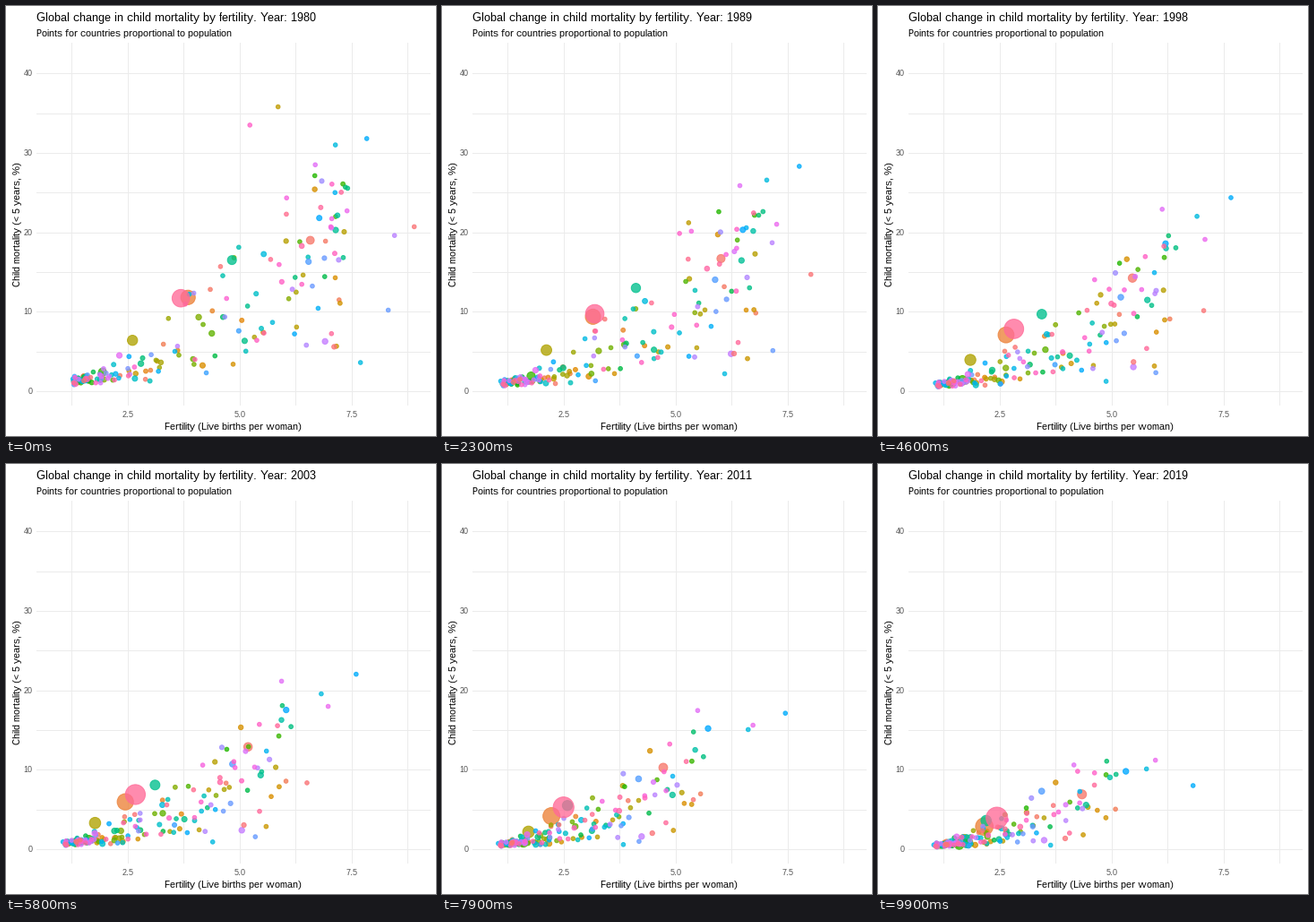
These frames come from a looping animation (480 by 480 pixels, 10000 ms). A matplotlib script:

```python
import matplotlib.pyplot as plt
import numpy as np
from matplotlib.animation import FuncAnimation

FRAMES, INTERVAL = 100, 100
SIZE, DPI = 480, 72
LEFT, RIGHT, TOP, BOTTOM = 34, 474, 41, 446
X_LIM, Y_LIM = (0.466, 9.266), (-1.812, 43.868)
ALPHA, STROKE, SMALL = 0.78, 1.0, 2.8

plt.rcParams.update({
    "font.family": ["Liberation Sans", "DejaVu Sans"],
    "text.hinting": "native",
    "text.hinting_factor": 1,
})


def hcl(k, light=65, chroma=100):
    """Evenly spaced hue, k in 0..1, as RGB through CIE Luv."""
    a = np.radians(15 + 360 * k)
    u = chroma * np.cos(a) / (13 * light) + 0.1978
    v = chroma * np.sin(a) / (13 * light) + 0.4683
    y = ((light + 16) / 116) ** 3
    x = 9 * y * u / (4 * v)
    z = 3 * y / v - x / 3 - 5 * y
    lin = np.clip([3.2406 * x - 1.5372 * y - 0.4986 * z,
                   -0.9689 * x + 1.8758 * y + 0.0415 * z,
                   0.0557 * x - 0.2040 * y + 1.0570 * z], 0, 1)
    return np.where(lin > 0.0031, 1.055 * lin ** (1 / 2.4) - 0.055, 12.92 * lin)


class Track:
    """A point easing from start to end; bend above 1 means an early fall."""

    def __init__(self, hue, start, end, bend=(1, 1), r=SMALL, spike=0):
        self.hue, self.r, self.spike = hue, r, spike
        self.start, self.end, self.bend = map(np.array, (start, end, bend))

    def at(self, t):
        x, y = self.end + (self.start - self.end) * (1 - t) ** self.bend
        y += self.spike * np.exp(-((t - 0.323) / 0.06) ** 2)
        return x, y, self.r + 0.3 * (self.r - SMALL) * t


tracks = [
    # large populations
    Track(0.95, (3.69, 11.7), (2.44, 3.93), (1.9, 1.1), r=10.3),
    Track(0.045, (3.85, 11.8), (2.16, 2.85), (2, 1.2), r=8.6),
    Track(0.003, (6.58, 19), (4.34, 6.9), (1.1, 0.8), r=4.9),
    Track(0.42, (4.83, 16.5), (2.2, 3.6), (1.2, 1.2), r=5.5),
    Track(0.18, (2.61, 6.4), (1.71, 1.1), (3, 1), r=6.2),
    Track(0.3, (1.94, 2.4), (1.6, 0.55), (2.5, 1.2), r=5),
    Track(0.63, (6.78, 21.8), (5.32, 9.8), (0.8, 0.5), r=3.5),
    Track(0.66, (6.54, 16.3), (3.44, 7.3), (0.9, 1.1), r=3.6),
    # small ones on the rim of the cloud
    Track(0.615, (7.84, 31.8), (6.82, 8), (0.3, 0.6)),
    Track(0.545, (7.14, 31), (5.78, 10.1), (0.3, 0.9)),
    Track(0.79, (6.69, 28.5), (4.16, 10.6), (0.4, 0.6)),
    Track(0.15, (5.86, 35.8), (2.5, 2.7), (0.7, 2.2)),
    Track(0.88, (5.23, 33.5), (4.62, 9.6), (1, 3.2)),
    Track(0.99, (8.9, 20.7), (3.7, 5.5), (0.7, 1.9)),
    Track(0.735, (8.46, 19.6), (3.98, 3.6), (1.3, 1), spike=27.5),
    Track(0.67, (8.32, 10.2), (2.9, 0.9), (0.9, 3)),
    Track(0.81, (7.4, 22.7), (5.98, 11.2), (0.4, 0.6)),
    Track(0.55, (7.7, 3.6), (3.64, 0.5), (1.9, 2.3)),
]

# All other countries: ranked by fertility, mortality growing with its square
N = 168
rng = np.random.default_rng(12)
rank = (np.arange(N) + 0.5) / N
phase = rng.uniform(0, 2 * np.pi, N)
spread = np.clip(rng.normal(-0.05, 0.5, N), -1.3, 0.7)
lift = rng.uniform(0.9, 1.9, N)
crowd_r = SMALL + 0.9 * rng.random(N) ** 6
crowd_hue = rng.random(N)


def crowd(t):
    u = np.clip(rank + 0.2 * rank * (1 - rank) * np.sin(phase + 3.5 * t), 0, 1)
    early = 1.4 + 5.9 * (u * u * (3 - 2 * u)) ** 1.3
    late = 1.15 + 0.95 * u + 3.1 * u ** 4
    x = early + (late - early) * t ** (0.2 + 0.9 * u)
    x += 0.12 * np.sin(7 * phase)
    y = (0.36 - 0.08 * t) * x ** 2
    y *= np.exp(spread + 0.12 * np.sin(2 * phase + 5 * t))
    y /= (1 + (y / (30 - 15 * t)) ** 4) ** 0.25
    return x, np.hypot(y, (0.8 - 0.55 * t) * lift), crowd_r


hues = np.append([p.hue for p in tracks], crowd_hue)
order = np.argsort(hues)
colors = [(*hcl(k), ALPHA) for k in hues[order]]


def state(t):
    dots = np.vstack([[p.at(t) for p in tracks], np.column_stack(crowd(t))])
    x, y, r = dots[order].T
    return np.column_stack([x, y]), (2 * r - STROKE) ** 2


fig = plt.figure(figsize=(SIZE / DPI, SIZE / DPI), dpi=DPI, facecolor="white")
ax = fig.add_axes([LEFT / SIZE, 1 - BOTTOM / SIZE,
                   (RIGHT - LEFT) / SIZE, (BOTTOM - TOP) / SIZE])
ax.set(xlim=X_LIM, ylim=Y_LIM)
ax.axis("off")


def label(x, y, text, size, color="black", **kw):
    return fig.text(x / SIZE, 1 - y / SIZE, text, fontsize=size, color=color, **kw)


for gx in np.arange(1.25, 9, 1.25):
    ax.axvline(gx, color="#EBEBEB", lw=1, zorder=0)
for gy in range(0, 41, 5):
    ax.axhline(gy, color="#EBEBEB", lw=1, zorder=0)
for tx in (2.5, 5.0, 7.5):
    label(11 + 50 * tx, 459, f"{tx:.1f}", 9, "#4D4D4D", ha="center")
for ty in range(0, 41, 10):
    label(29.5, 433 - 8.865 * ty, str(ty), 9, "#4D4D4D", ha="right")

title = label(34, 17, "", 13)
label(34, 34, "Points for countries proportional to population", 11)
label(253.5, 473, "Fertility (Live births per woman)", 11, ha="center")
label(16, 243.5, "Child mortality (< 5 years, %)", 11, rotation=90,
      rotation_mode="anchor", ha="center")

xy, area = state(0)
dots = ax.scatter(*xy.T, s=area, c=colors, edgecolors=colors,
                  linewidths=STROKE, zorder=2)


def draw(f):
    t = f / (FRAMES - 1)
    xy, area = state(t)
    dots.set_offsets(xy)
    dots.set_sizes(area)
    year = round(1980 + 39 * t)
    title.set_text(f"Global change in child mortality by fertility. Year: {year}")
    return dots, title


anim = FuncAnimation(fig, draw, frames=FRAMES, interval=INTERVAL,
                     repeat=True, repeat_delay=0)
plt.show()
```
